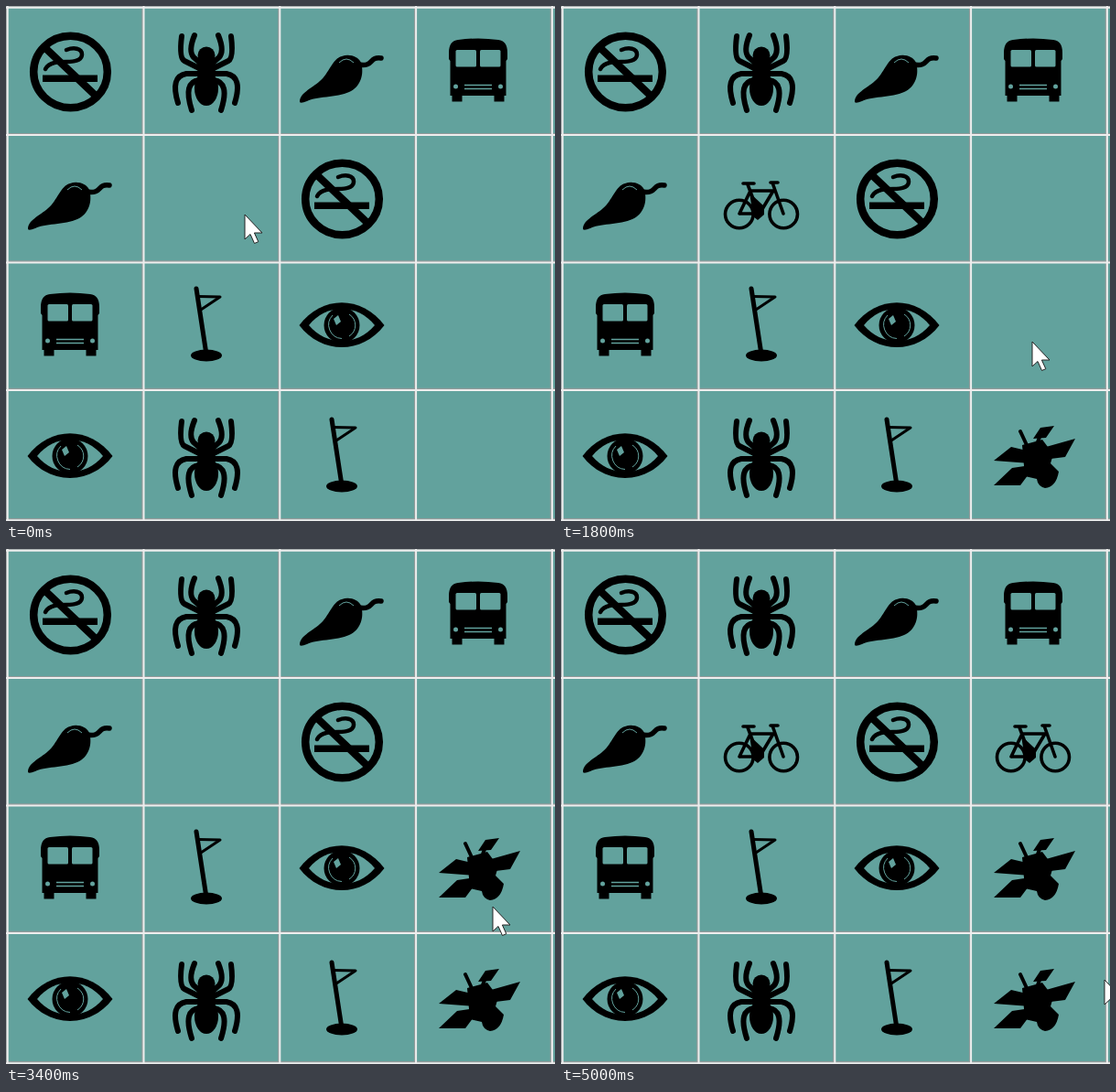
These frames come from a looping animation (600 px wide and 563 px high, 7.5 s). An HTML page:

```html
<!DOCTYPE html>
<html lang="en">
<head>
<meta charset="utf-8">
<title>Memory game</title>
<style>
html, body { margin: 0; width: 100%; height: 100%; overflow: hidden; background: #62a29d; }
svg { display: block; width: 600px; height: 563px; }
.ln { fill: none; stroke: #000; stroke-linecap: round; stroke-linejoin: round; }
.bg { fill: #62a29d; }
.bgln { fill: none; stroke: #62a29d; }
</style>
</head>
<body>
<svg viewBox="0 0 600 563">
  <!-- Icons are drawn around the middle of a cell. -->
  <defs>
    <g id="smoke">
      <ellipse class="ln" cx=".5" cy="1" rx="40.3" ry="39.3" stroke-width="8.500"/>
      <path class="ln" d="M-28 -26L29 28" stroke-width="8"/>
      <path d="M-30 4.500H30V12H-30z"/>
      <path class="ln" d="M-4 -23C4 -26 13 -25 13 -18C13 -11 4 -10 -4 -10S-23 -10 -27 -2" stroke-width="4.500"/>
    </g>
    <g id="spider">
      <circle cy="-17" r="9.500"/>
      <path d="M-8 -11H8L10 3H-10z"/>
      <ellipse cy="19" rx="13" ry="19"/>
      <path id="legs" class="ln" stroke-width="6" d="M-27 -38Q-30 -14 -24 -11L-8 -3M-13 -39Q-20 -22 -14 -15L-6 -8M-8 3H-22Q-40 6 -31 35M-8 10Q-26 12 -16 43"/>
      <use href="#legs" transform="scale(-1 1)"/>
    </g>
    <g id="chili">
      <path d="M-46 34C-46 24 -34 20 -24 11C-14 3 -10 -14 0 -16C8 -19 18 -16 21 -9C25 4 20 18 8 23C-5 29 -30 28 -38 33Q-45 36 -46 34z"/>
      <path class="ln" d="M18 -7C36 -4 29 -16 43 -14" stroke-width="5.500"/>
      <path class="bgln" d="M-3 -9Q5 -17 13 -9"/>
    </g>
    <g id="bus">
      <path d="M-32 -20Q-32 -33 -22 -34Q0 -37 22 -34Q32 -33 32 -20V-13L30.500 -11V27H-30.500V-11L-32 -13z"/>
      <g id="side">
        <path d="M-28.500 20H-17.500V33.500H-28.500z"/>
        <rect class="bg" x="-24.500" y="-23" width="22.500" height="18.500" rx="1.500"/>
        <circle class="bg" cx="-24.500" cy="17" r="2.500"/>
      </g>
      <use href="#side" transform="scale(-1 1)"/>
      <path class="bgln" d="M-15 15.500H15M-15 19.500H15" stroke-width="1.300"/>
    </g>
    <g id="flag">
      <path class="ln" d="M-11 -40L0 32" stroke-width="5"/>
      <path class="ln" d="M-9 -31.500L15 -31L-6 -17" stroke-width="3"/>
      <ellipse cy="33" rx="17" ry="6.500"/>
    </g>
    <g id="eye">
      <path d="M-46.500 0C-22 -33 22 -33 46.500 0C22 32 -22 32 -46.500 0z"/>
      <path class="bg" d="M-36 0C-17 -24 17 -24 36 0C17 23 -17 23 -36 0z"/>
      <circle r="19.500"/>
      <path class="bgln" d="M-10 -11A15 15 0 0 0 0 14.500M8 -12A14 14 0 0 1 8 12"/>
      <path class="bg" d="M-9 -7L-4 -11L-1 -4L-6 0z"/>
    </g>
    <g id="bike">
      <g class="ln" stroke-width="3.600">
        <circle cx="-24.200" cy="17.500" r="15.300"/>
        <circle cx="24.200" cy="17.500" r="15.300"/>
        <path d="M-24 17L-12 -8H13L-2 17H-24M-15 -15L-3 17M12 -17L24 17M-20 -16H-8M10 -17H18"/>
      </g>
      <path d="M-13 -6L3 9V18L-4 24L-9 20z"/>
    </g>
    <g id="sat">
      <path d="M-43 5L-24 -10L6 -3L-2 8zM-43 32L-23 13L3 9L-14 32zM14 -10L46 -19L35 1L11 4zM0 -19L8 -31L23 -33L14 -20z"/>
      <path d="M-12 -12L10 -18L22 -2L19 8L28 17Q25 34 13 35Q5 33 4 25L-9 22z"/>
      <path class="ln" d="M-14 -27L-7 -12M7 -21L4 -12" stroke-width="4"/>
    </g>
  </defs>
  <g id="board"></g>
  <path id="cursor" d="M0 0V27L6 21.500L10.500 31.500L14.800 29.700L10.400 20H19z" fill="#fff" stroke="#222"/>
</svg>
<script>
const LOOP = 7500, STEP = 100;
const layout = [
  'smoke spider chili bus',
  'chili bike smoke bike',
  'bus flag eye sat',
  'eye spider flag sat'
].map(row => row.split(' '));
// time, column, row
const clicks = [
  [400, 1, 1], [1200, 3, 3], [1900, 3, 2],
  [3400, 3, 3], [3800, 3, 1], [4500, 1, 1]
];
// time, x, y where the pointer rests or turns
const stops = [
  [0, 261, 228], [200, 248, 227], [400, 248, 227], [1100, 536, 522],
  [1200, 550, 463], [1600, 515, 367], [1900, 515, 367], [2600, 341, 178],
  [3300, 516, 436], [3400, 532, 391], [3700, 526, 230], [3900, 526, 230],
  [4300, 263, 238], [4600, 250, 236], [4900, 520, 344], [5000, 594, 471]
];

const board = document.getElementById('board');
const cursor = document.getElementById('cursor');

function add(tag, attrs) {
  const el = document.createElementNS('http://www.w3.org/2000/svg', tag);
  for (const k in attrs) el.setAttribute(k, attrs[k]);
  return board.appendChild(el);
}

function drawGrid(color, shift, width) {
  let d = `M0 ${562 + shift}H600`;
  for (let i = 0; i < 5; i++) d += `M${1.5 + 148.8 * i + shift} 0V563`;
  for (let i = 0; i < 4; i++) d += `M0 ${1.5 + 139.4 * i + shift}H600`;
  add('path', { d, stroke: color, 'stroke-width': width });
}

drawGrid('#929a9a', -1.2, 1.6);
drawGrid('#eeeeee', 0.2, 2);

const cards = layout.map((row, r) => row.map((name, c) => {
  const x = 70 + Math.round(148.7 * c);
  const y = 71 + 139 * r + (r === 3 ? 4 : 0);
  return add('use', { href: '#' + name, transform: `translate(${x} ${y})` });
}));

// A pair that does not match turns back at the next click.
function hiddenAt(t) {
  const hidden = new Set(clicks.map(([, c, r]) => cards[r][c]));
  let open = [];
  for (const [at, c, r] of clicks) {
    if (at > t) break;
    if (open.length === 2) {
      open.forEach(o => hidden.add(o.card));
      open = [];
    }
    const name = layout[r][c], card = cards[r][c];
    hidden.delete(card);
    open = open.length && open[0].name === name ? [] : [...open, { name, card }];
  }
  return hidden;
}

function pointerAt(t) {
  const i = stops.findIndex(s => s[0] > t);
  if (i < 0) return stops[stops.length - 1].slice(1);
  const [t0, x0, y0] = stops[i - 1], [t1, x1, y1] = stops[i];
  const u = (t - t0) / (t1 - t0), k = u * u * (3 - 2 * u);
  return [x0 + (x1 - x0) * k, y0 + (y1 - y0) * k];
}

function render(now) {
  const t = Math.floor((now % LOOP) / STEP) * STEP;
  const hidden = hiddenAt(t);
  cards.flat().forEach(card => { card.style.display = hidden.has(card) ? 'none' : ''; });
  cursor.setAttribute('transform', `translate(${pointerAt(t).join(' ')})`);
}

const start = performance.now();
function tick() {
  render(performance.now() - start);
  requestAnimationFrame(tick);
}
tick();
</script>
</body>
</html>
```
